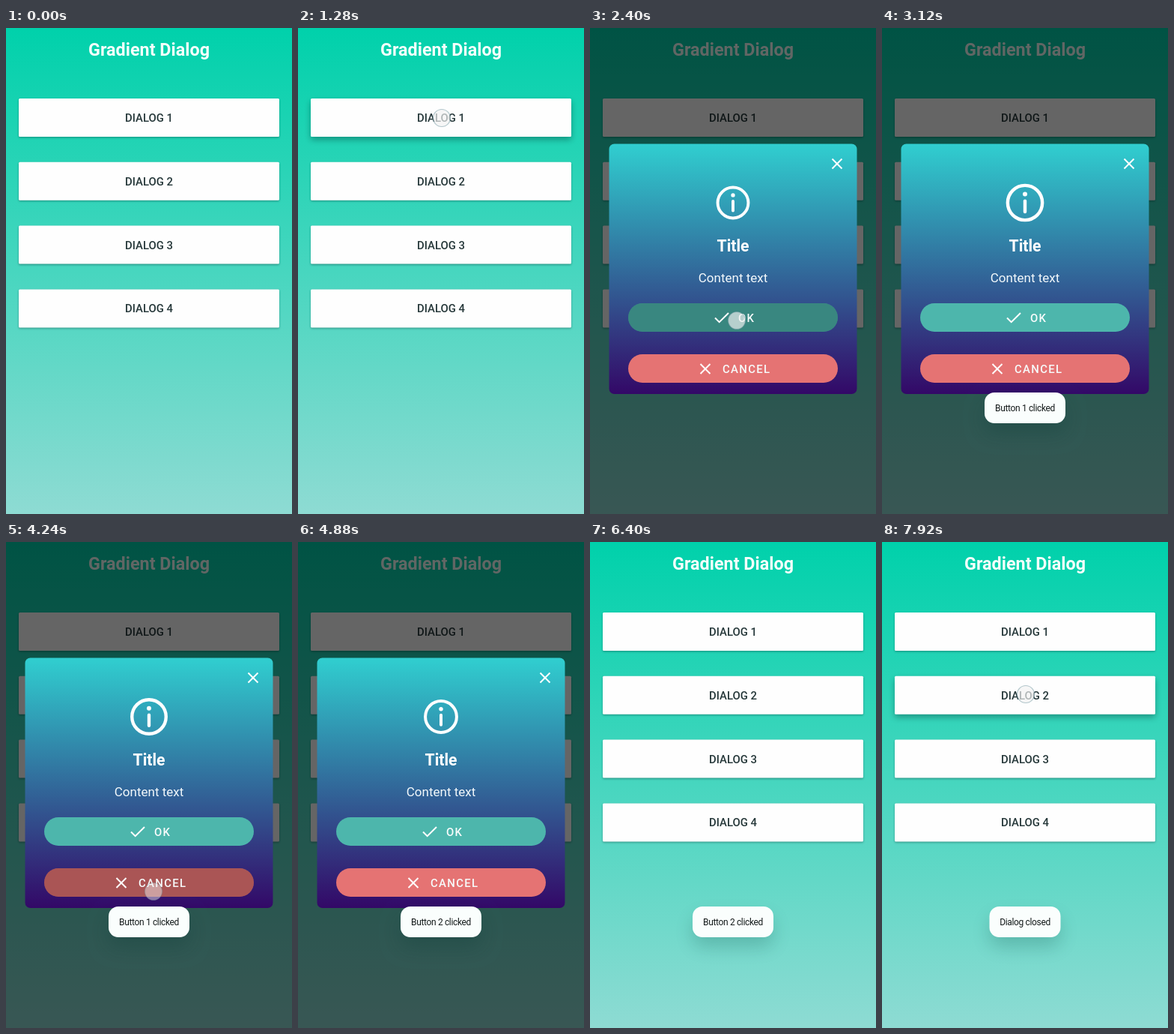
An HTML page with a canvas for the animation above (8 s loop, 382 by 648 pixels).

```html
<!DOCTYPE html>
<html lang="en">
<head>
<meta charset="utf-8">
<title>Gradient Dialog</title>
<style>
  html, body { margin: 0; width: 100%; height: 100%; overflow: hidden; background: #00d1ab; }
  canvas { display: block; }
</style>
</head>
<body>
<canvas id="stage" width="382" height="648"></canvas>
<script>
const W = 382, H = 648, LOOP = 8000;
const ctx = document.getElementById('stage').getContext('2d');

// Times in ms
const OPEN = 1440, CLOSE = 6160;
const PULSE = 1030, PULSE_START = 1560;
const taps = {
  dialog1: { x: 192, y: 120, from: 880, to: 1280 },
  ok:      { x: 196, y: 390, from: 2120, to: 2420 },
  cancel:  { x: 197, y: 466, from: 4080, to: 4380 },
  close:   { x: 330, y: 182, from: 5880, to: 6120 },
  dialog2: { x: 192, y: 203, from: 7680, to: 8200 }
};
const toasts = [
  { text: 'Button 1 clicked', from: 2520, to: 4520 },
  { text: 'Button 2 clicked', from: 4680, to: 6560 },
  { text: 'Dialog closed',    from: 6740, to: 9000 }
];

const clamp = v => Math.max(0, Math.min(1, v));
const ease = v => (1 - Math.cos(Math.PI * clamp(v))) / 2;
const fade = (t, from, to, rise, fall) =>
  ease((t - from) / rise) * (1 - ease((t - to) / fall));
const press = (t, tap) => fade(t, tap.from, tap.to, 150, 150);

function vertical(y0, y1, top, bottom) {
  const g = ctx.createLinearGradient(0, y0, 0, y1);
  g.addColorStop(0, top);
  g.addColorStop(1, bottom);
  return g;
}

function box(x, y, w, h, r, fill) {
  ctx.beginPath();
  ctx.roundRect(x, y, w, h, r);
  ctx.fillStyle = fill;
  ctx.fill();
}

function shadow(color, blur, dy) {
  ctx.shadowColor = color;
  ctx.shadowBlur = blur;
  ctx.shadowOffsetY = dy;
}

function label(text, x, y, weight, size, color, align = 'center', spacing = 0) {
  ctx.font = `${weight} ${size}px Roboto, sans-serif`;
  ctx.letterSpacing = spacing + 'px';
  ctx.textAlign = align;
  ctx.fillStyle = color;
  ctx.fillText(text, x, y);
}

function line(width, ...points) {
  ctx.beginPath();
  points.forEach(([x, y]) => ctx.lineTo(x, y));
  ctx.strokeStyle = '#fff';
  ctx.lineWidth = width;
  ctx.stroke();
}

function cross(x, y, r) {
  line(2, [x - r, y - r], [x + r, y + r]);
  line(2, [x - r, y + r], [x + r, y - r]);
}

function disc(x, y, r) {
  ctx.beginPath();
  ctx.arc(x, y, r, 0, 2 * Math.PI);
}

function drawHome(t) {
  ctx.fillStyle = vertical(0, H, '#00d1ab', '#8edbd3');
  ctx.fillRect(0, 0, W, H);
  label('Gradient Dialog', 191, 37, 700, 23.35, '#f4fffb');
  for (let i = 0; i < 4; i++) {
    const y = 94 + i * 84.8;
    const tap = taps['dialog' + (i + 1)];
    const lift = tap ? press(t, tap) : 0;
    ctx.save();
    shadow('rgba(0,60,55,.42)', 3 + 6 * lift, 1.3 + 2.7 * lift);
    box(17, y, 348, 51, 1.5, '#fefefe');
    ctx.restore();
    label('DIALOG ' + (i + 1), 191, y + 31, 500, 14.86, '#26383a');
  }
}

function drawInfo(t) {
  const scale = 1.1 - 0.1 * Math.cos(2 * Math.PI * (t - PULSE_START) / PULSE);
  ctx.save();
  ctx.translate(191, 233);
  ctx.scale(scale, scale);
  ctx.strokeStyle = ctx.fillStyle = '#fff';
  ctx.lineWidth = 3.7;
  disc(0, 0, 19.3);
  ctx.stroke();
  disc(0, -9.5, 2.5);
  ctx.fill();
  ctx.lineCap = 'round';
  line(3.7, [0, -2], [0, 10]);
  ctx.restore();
}

function drawPill(y, color, text, x, pressed) {
  box(51, y, 280, 38, 19, color);
  if (pressed) box(51, y, 280, 38, 19, `rgba(0,0,0,${0.26 * pressed})`);
  label(text, x, y + 24.6, 500, 14.86, '#f7fbfb', 'left', 1.33);
}

function drawDialog(t) {
  const alpha = fade(t, OPEN, CLOSE, 220, 180);
  if (!alpha) return;
  ctx.fillStyle = `rgba(0,0,0,${0.6 * fade(t, OPEN, CLOSE, 160, 200)})`;
  ctx.fillRect(0, 0, W, H);

  ctx.save();
  ctx.globalAlpha = alpha;
  box(25.5, 154.5, 331, 333.5, 7, vertical(154, 488, '#30cfd0', '#330867'));
  cross(330, 181, 6.5);
  drawInfo(t);
  label('Title', 191, 298, 700, 21.2, '#fff');
  label('Content text', 191, 339, 400, 17, '#f2f8fb');
  drawPill(367, '#4db6ac', 'OK', 198, press(t, taps.ok));
  line(2, [167, 386.5], [172.7, 392.2], [185, 380]);
  drawPill(435, '#e57373', 'CANCEL', 177, press(t, taps.cancel));
  cross(154, 454.5, 6.5);
  ctx.restore();
}

function drawToast(t, { text, from, to }) {
  const alpha = fade(t, from, to, 200, 150);
  if (!alpha) return;
  const w = text === 'Dialog closed' ? 95 : 108;
  ctx.save();
  ctx.globalAlpha = alpha;
  ctx.save();
  shadow('rgba(0,50,45,.2)', 24, 13);
  box(191 - w / 2, 486, w, 41, 13, '#fafefd');
  ctx.restore();
  label(text, 191, 511, 400, 12, '#141a1a', 'center', -0.35);
  ctx.restore();
}

function drawTouch(t, tap) {
  const alpha = fade(t, tap.from + 60, tap.to, 160, 100);
  if (!alpha) return;
  ctx.save();
  ctx.globalAlpha = alpha;
  disc(tap.x, tap.y, 11.5);
  ctx.fillStyle = 'rgba(242,242,242,.68)';
  ctx.fill();
  ctx.strokeStyle = 'rgba(110,150,160,.5)';
  ctx.lineWidth = 1.2;
  ctx.stroke();
  ctx.restore();
}

function render(now) {
  const t = now % LOOP;
  drawHome(t);
  drawDialog(t);
  toasts.forEach(toast => drawToast(t, toast));
  Object.values(taps).forEach(tap => drawTouch(t, tap));
}

const start = performance.now();
function tick() {
  render(performance.now() - start);
  requestAnimationFrame(tick);
}
tick();
</script>
</body>
</html>
```
